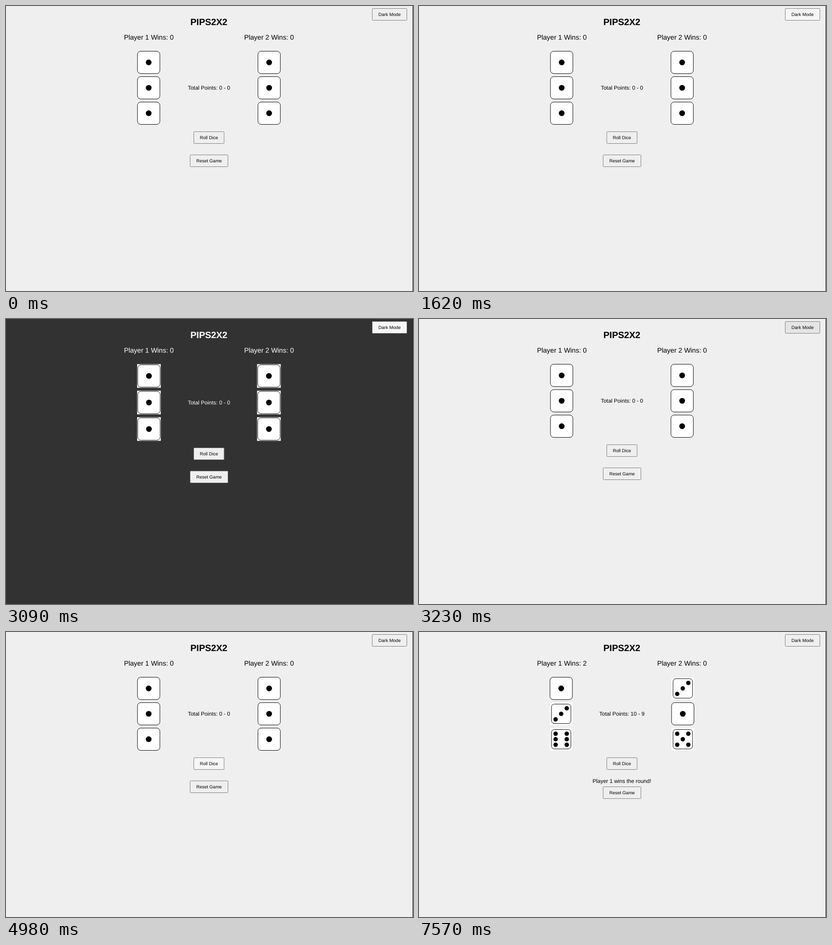
Animation of 894x627 px, one loop 8 s. Source, as an HTML page:

```html
<!DOCTYPE html>
<html lang="en">
<head>
<meta charset="utf-8">
<title>Dice duel</title>
<style>
  html, body { margin: 0; width: 100%; height: 100%; overflow: hidden; background: #efefef; }
  svg { display: block; }
  text { font-family: "Liberation Sans", Arial, sans-serif; text-anchor: middle; text-rendering: geometricPrecision; }
</style>
</head>
<body>
<svg id="stage" width="894" height="627" viewBox="0 0 894 627"></svg>
<script>
const LOOP = 8000;
const FILLS = { idle: '#efefef', hover: '#e5e5e5', active: '#f6f6f6' };

const ROUNDS = [
  { from: 0, dice: [[1, 1, 1], [1, 1, 1]], total: '0 - 0', wins: 0, columns: [313.4, 578] },
  { from: 5120, dice: [[3, 4, 2], [1, 2, 3]], total: '9 - 6', wins: 1, columns: [313.4, 578] },
  { from: 7430, dice: [[1, 3, 6], [3, 1, 5]], total: '10 - 9', wins: 2, columns: [312.3, 579.4] }
];

// Pointer history: [time, button, button state]
const POINTER = [
  [0, '', 'idle'],
  [920, 'mode', 'hover'], [1620, 'mode', 'active'], [1760, 'mode', 'hover'], [1970, '', 'idle'],
  [2390, 'mode', 'hover'], [3090, 'mode', 'active'], [3230, 'mode', 'hover'], [3510, '', 'idle'],
  [4000, 'roll', 'hover'], [4070, '', 'idle'],
  [4350, 'roll', 'hover'], [4980, 'roll', 'active'], [5120, 'roll', 'hover'], [5400, '', 'idle'],
  [6100, 'reset', 'hover'], [6170, 'roll', 'hover'], [6240, '', 'idle'],
  [6870, 'roll', 'hover'], [7290, 'roll', 'active'], [7430, 'roll', 'hover'], [7570, '', 'idle']
];

const text = (x, y, size, label, color, weight = 400) =>
  `<text x="${x}" y="${y}" font-size="${size}" font-weight="${weight}" fill="${color}">${label}</text>`;

const rect = (x, y, w, h, attrs) => `<rect x="${x}" y="${y}" width="${w}" height="${h}" ${attrs}/>`;

const square = (x, y, half, attrs) => rect(x - half, y - half, 2 * half, 2 * half, attrs);

const button = (x, y, w, label, fill) =>
  rect(x, y, w, 26, `rx="1.2" fill="${fill}" stroke="#7b7b7b"`) + text(x + w / 2, y + 16.2, 10, label, '#000');

// Pip positions in units of the pip spacing
function pips(value) {
  const spots = value % 2 ? [[0, 0]] : [];
  if (value > 1) spots.push([1, -1], [-1, 1]);
  if (value > 3) spots.push([-1, -1], [1, 1]);
  if (value === 6) spots.push([-1, 0], [1, 0]);
  return spots;
}

function die(x, y, value, dark) {
  const single = value === 1;
  const backing = dark ? square(x, y, 26, 'fill="#fff"') : single ? '' : square(x, y, 24.8, 'fill="#fff"');
  const face = square(x, y, single ? 24.6 : 21.4, `rx="${single ? 7 : 6.5}" fill="#fff" stroke="#000"`);
  const dots = pips(value).map(([dx, dy]) =>
    `<circle cx="${x + dx * 12.2}" cy="${y + dy * 12.1}" r="${single ? 6.3 : 4.8}"/>`);
  return backing + face + dots.join('');
}

function draw(round, [, target, state], dark) {
  const ink = dark ? '#fff' : '#000';
  const fill = name => FILLS[name === target ? state : 'idle'];
  const columns = dark ? [314, 577.5] : round.columns;
  const top = dark ? 125.3 : 124.1;
  const pitch = dark ? 58.4 : 55.9;
  const resetY = dark ? 334.5 : round.wins ? 340.5 : 327.5;
  const dice = round.dice.map((values, i) =>
    values.map((value, row) => die(columns[i], top + row * pitch, value, dark)).join(''));

  return rect(0, 0, 894, 627, `fill="${dark ? '#323232' : '#efefef'}"`) +
    rect(893, 0, 1, 627, 'fill="#1c1c1c"') +
    text(445.6, 41.5, 20, 'PIPS2X2', ink, 700) +
    text(313.8, 74, 15, `Player 1 Wins: ${round.wins}`, ink) +
    text(577.8, 74, 15, 'Player 2 Wins: 0', ink) +
    dice.join('') +
    text(445.8, dark ? 187.8 : 184.1, 12, `Total Points: ${round.total}`, ink) +
    button(804.5, 5.5, 76, 'Dark Mode', fill('mode')) +
    button(412.5, dark ? 283.5 : 276.5, 66.5, 'Roll Dice', fill('roll')) +
    (round.wins ? text(445.7, 331.8, 12, 'Player 1 wins the round!', ink) : '') +
    button(404.5, resetY, 83, 'Reset Game', fill('reset'));
}

const stage = document.getElementById('stage');
const start = performance.now();
let shown = '';

function tick() {
  const t = (performance.now() - start) % LOOP;
  const round = ROUNDS.findLast(r => r.from <= t);
  const pointer = POINTER.findLast(p => p[0] <= t);
  const markup = draw(round, pointer, t >= 1760 && t < 3230);
  if (markup !== shown) stage.innerHTML = shown = markup;
  requestAnimationFrame(tick);
}
tick();
</script>
</body>
</html>
```
